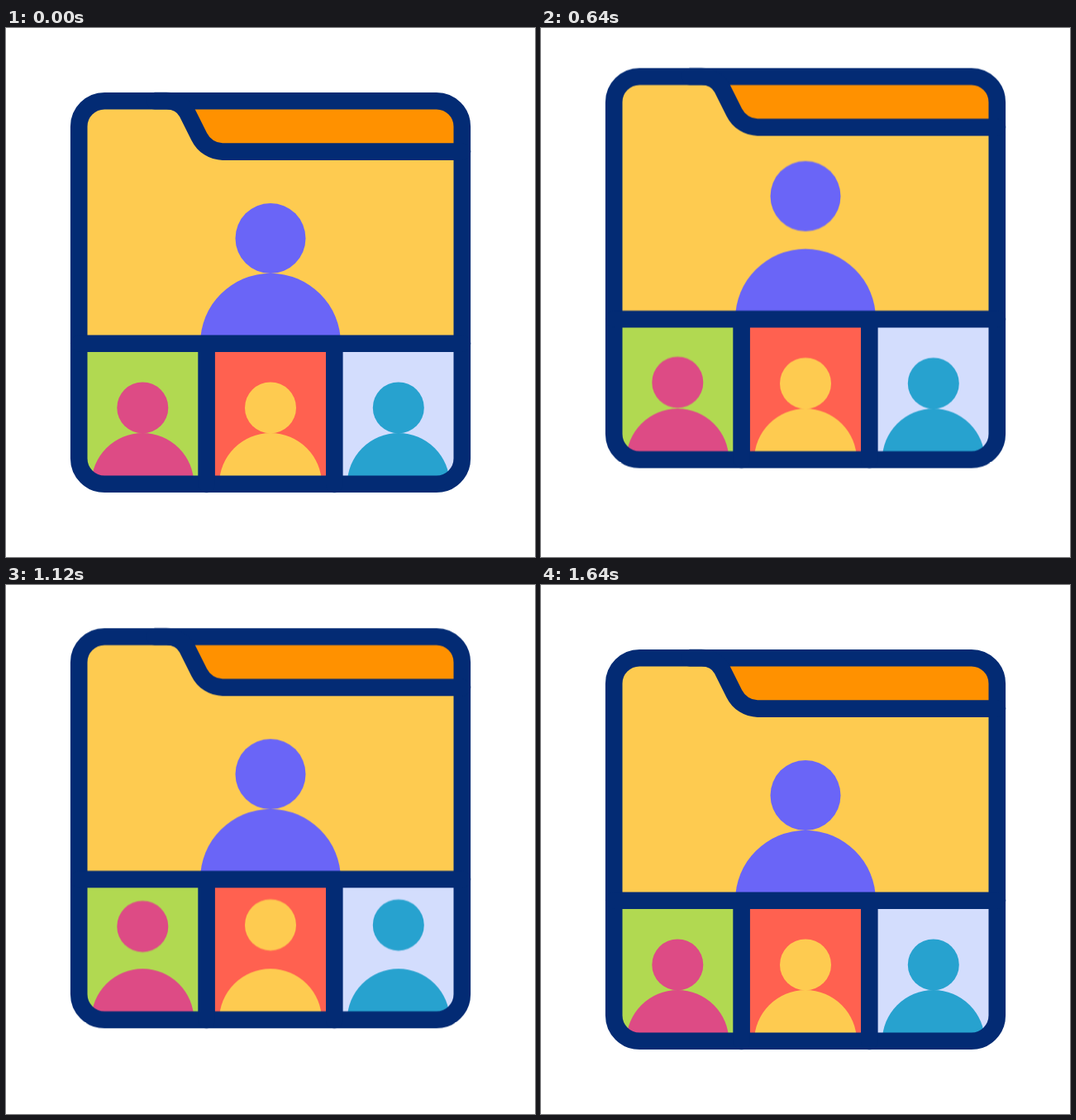
An HTML page for the animation above (1720 ms loop, 640 px wide and 640 px high).

```html
<!DOCTYPE html>
<html lang="en">
<head>
<meta charset="utf-8">
<title>Group folder</title>
<style>
  html, body { margin: 0; width: 100%; height: 100%; overflow: hidden; background: #fff; }
  svg { display: block; width: 100vw; height: 100vh; }

  .card, .head {
    animation: 1720ms cubic-bezier(.56, 0, .44, 1) infinite;
  }
  .card { animation-name: float; }
  .host { animation-name: nod; }
  .guest { animation-name: hop; animation-delay: var(--wait, 0ms); }

  @keyframes float {
    0%, 2.326%, 95.349%, 100% { transform: translateY(0); }
    48.837% { transform: translateY(-32.4px); }
  }
  @keyframes nod {
    0%, 2.326%, 53.95%, 100% { transform: translateY(0); }
    28.14% { transform: translateY(-27.3px); }
  }
  @keyframes hop {
    0%, 31.86%, 85.35%, 100% { transform: translateY(0); }
    58.6% { transform: translateY(-22.6px); }
  }
</style>
</head>
<body>
<svg viewBox="0 0 640 640">
  <defs>
    <clipPath id="inside">
      <rect x="88.2" y="88.2" width="463.6" height="463.6" rx="31"/>
    </clipPath>
    <path id="torso" d="M-62 0A62 62 0 0 1 62 0Z"/>
  </defs>

  <g class="card">
    <g clip-path="url(#inside)">
      <rect x="88" y="88" width="464" height="294" fill="#fecb50"/>
      <path fill="#ff9100" d="M194 88C204.5 88 214.6 93.2 219.3 102.6L233.8 131.6C239.2 142.5 250.3 149.6 262 149.6H552V88Z"/>
      <rect x="88" y="382" width="154.5" height="170" fill="#b1d951"/>
      <rect x="242.5" y="382" width="154.8" height="170" fill="#ff6150"/>
      <rect x="397.3" y="382" width="154.7" height="170" fill="#d3ddfd"/>

      <g fill="#6a65f7">
        <path d="M235 381.8A85 85 0 0 1 405 381.8Z"/>
        <circle class="head host" cx="320" cy="254.4" r="42.5"/>
      </g>
      <g fill="#dd4b85">
        <use href="#torso" x="165.3" y="552"/>
        <circle class="head guest" cx="165.3" cy="459.4" r="31"/>
      </g>
      <g fill="#fecb50">
        <use href="#torso" x="320" y="552"/>
        <circle class="head guest" style="--wait: 80ms" cx="320" cy="459.4" r="31"/>
      </g>
      <g fill="#27a2cf">
        <use href="#torso" x="474.8" y="552"/>
        <circle class="head guest" style="--wait: 160ms" cx="474.8" cy="459.4" r="31"/>
      </g>
    </g>

    <g fill="none" stroke="#032b74" stroke-width="20.6" stroke-linecap="round">
      <rect x="88.2" y="88.2" width="463.6" height="463.6" rx="31"/>
      <path d="M180 88.1H194C204.5 88.1 214.6 93.2 219.3 102.6L233.8 131.6C239.2 142.5 250.3 149.6 262 149.6H552"/>
      <path d="M88.2 381.8H552M242.6 381.8V552M397.3 381.8V552"/>
    </g>
  </g>
</svg>
</body>
</html>
```
